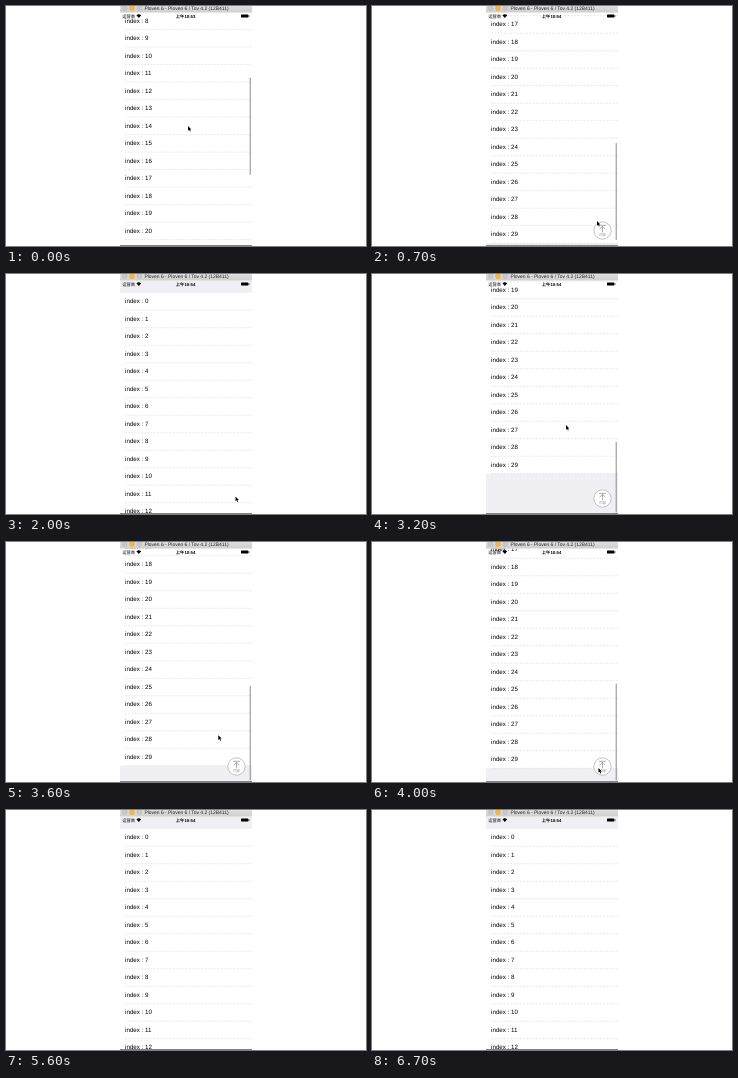
An HTML page for the animation above (6900 ms loop, 360 by 240 pixels).

```html
<!DOCTYPE html>
<html lang="zh">
<head>
<meta charset="utf-8">
<title>Scrolling list</title>
<style>
  html, body { margin: 0; width: 100%; height: 100%; overflow: hidden; background: #fff; }
  svg { display: block; width: 100vw; height: 100vh; }
  text {
    font-family: "Liberation Sans", "Noto Sans CJK SC", "Noto Sans CJK", sans-serif;
    text-rendering: geometricPrecision;
  }
  .row { font-size: 6.2px; }
  .status { font-size: 4.3px; }
</style>
</head>
<body>
<svg viewBox="0 0 360 240">
  <defs>
    <clipPath id="screen"><rect x="114" y="6.5" width="132" height="232.5"/></clipPath>
    <linearGradient id="chrome" x1="0" y1="0" x2="0" y2="1">
      <stop offset="0" stop-color="#dedede"/><stop offset="1" stop-color="#cfcfcf"/>
    </linearGradient>
  </defs>
  <rect width="360" height="240" fill="#fff"/>

  <g clip-path="url(#screen)">
    <rect x="114" y="6" width="132" height="234" fill="#efeff4"/>
    <g id="list"><rect x="114" y="18.75" width="132" height="525" fill="#fff"/></g>
    <rect id="bar" x="243.7" width="1" rx=".5" fill="#8c8c8c"/>
    <g id="button">
      <circle cx="230.5" cy="224.5" r="8.7" fill="#fff" stroke="#aaa" stroke-width=".7"/>
      <path d="M227 219.3h7M230.5 226.4v-6M227.6 223.2l2.9-2.9 2.9 2.9" fill="none" stroke="#888" stroke-width=".7"/>
      <text x="230.5" y="230.2" font-size="3.6" text-anchor="middle" fill="#999">顶部</text>
    </g>
    <g class="status">
      <text x="116.2" y="11.5">运营商</text>
      <text id="clock" x="179.6" y="11.5" text-anchor="middle" font-weight="bold"></text>
      <path d="M130.4 9.2q2.4-1.9 4.8 0l-2.4 2.7z"/>
      <rect x="235" y="8.4" width="7.4" height="3.1" rx=".6"/>
      <rect x="242.7" y="9.3" width=".7" height="1.4" rx=".3"/>
    </g>
  </g>

  <rect x="114" width="132" height="6.5" fill="url(#chrome)"/>
  <g stroke-width=".4">
    <circle cx="118.7" cy="2" r="2.5" fill="#c8c8c8" stroke="#b4b4b4"/>
    <circle cx="126" cy="2" r="2.5" fill="#f6b93b" stroke="#dca032"/>
    <circle cx="133.3" cy="2" r="2.5" fill="#c8c8c8" stroke="#b4b4b4"/>
  </g>
  <text x="180.5" y="4.2" font-size="4.95" text-anchor="middle" fill="#222">Ploven 6 - Ploven 6 / Tov 4.2 (12B411)</text>
  <rect x="114" y="239" width="132" height=".6" fill="#333"/>
  <path id="cursor" d="M0 0v4.7l1.1-1 .8 1.8 .8-.3-.8-1.8h1.5z" stroke="#fff" stroke-width=".5" paint-order="stroke"/>
</svg>
<script>
const LOOP = 6900, ROW = 17.5, ROWS = 30, TOP = 18.75;
const MAX_SCROLL = 317.5, BAR_TOP = 7, BAR_LENGTH = 97, BAR_RATE = 0.424;
const $ = id => document.getElementById(id);

function add(parent, name, attrs, text = "") {
  const node = document.createElementNS("http://www.w3.org/2000/svg", name);
  for (const key in attrs) node.setAttribute(key, attrs[key]);
  node.textContent = text;
  parent.append(node);
}

for (let i = 0; i < ROWS; i++) {
  const y = TOP + i * ROW;
  add($("list"), "text", { class: "row", x: 119.1, y: y + 10.4 }, `index : ${i}`);
  add($("list"), "path", {
    d: `M119 ${y + ROW}H246`, stroke: "#d2d2d2", "stroke-width": 0.5, "stroke-dasharray": "2 1.2"
  });
}

const clamp = v => Math.min(1, Math.max(0, v));
const part = (t, from, to) => clamp((t - from) / (to - from));
const smooth = p => (1 - Math.cos(Math.PI * p)) / 2;
const mix = (a, b, p) => a + (b - a) * p;

function scrollAt(t) {
  if (t < 1400) return MAX_SCROLL - 165.5 * Math.exp(-t / 258);
  if (t < 2500) return MAX_SCROLL * (1 - smooth(part(t, 1400, 2000)));
  if (t < 3200) return 344 * Math.sin(part(t, 2700, 3200) * Math.PI / 2);
  if (t < 4200) return mix(344, MAX_SCROLL, smooth(part(t, 3200, 3700)));
  return MAX_SCROLL * (1 - smooth(part(t, 4200, 4800)));
}

// Each stop: time, x, y of the pointer tip.
const pointer = [
  [0, 182, 120], [250, 182, 120], [700, 225, 215], [1000, 229.5, 222.5],
  [2500, 229.5, 222.5], [2800, 194, 151], [3250, 194, 151], [3900, 226.5, 226],
  [4200, 226.5, 226], [4500, 229.5, 225.5], [4900, 229.5, 225.5], [5550, 132, 0]
];

function pointerAt(t) {
  const next = pointer.findIndex(stop => stop[0] > t);
  if (next < 0) return null;
  const [t0, x0, y0] = pointer[next - 1], [t1, x1, y1] = pointer[next];
  const p = smooth(part(t, t0, t1));
  return [mix(x0, x1, p), mix(y0, y1, p)];
}

function barOpacity(t) {
  if (t < 2000) return 1 - part(t, 1000, 1400);
  return part(t, 2650, 2750) * (1 - part(t, 4050, 4350));
}

function draw(t) {
  const scroll = scrollAt(t);
  $("list").setAttribute("transform", `translate(0 ${-scroll})`);

  const excess = Math.max(0, scroll - MAX_SCROLL);
  $("bar").setAttribute("y", BAR_TOP + Math.min(scroll, MAX_SCROLL) * BAR_RATE + excess);
  $("bar").setAttribute("height", BAR_LENGTH - excess);
  $("bar").setAttribute("opacity", barOpacity(t));
  $("button").setAttribute("opacity", part(scroll, 200, 260));
  $("clock").textContent = t < 300 ? "上午10:53" : "上午10:54";

  const tip = pointerAt(t);
  $("cursor").setAttribute("visibility", tip ? "visible" : "hidden");
  if (tip) $("cursor").setAttribute("transform", `translate(${tip})`);
}

const start = performance.now();
function tick() {
  draw((performance.now() - start) % LOOP);
  requestAnimationFrame(tick);
}
tick();
</script>
</body>
</html>
```
